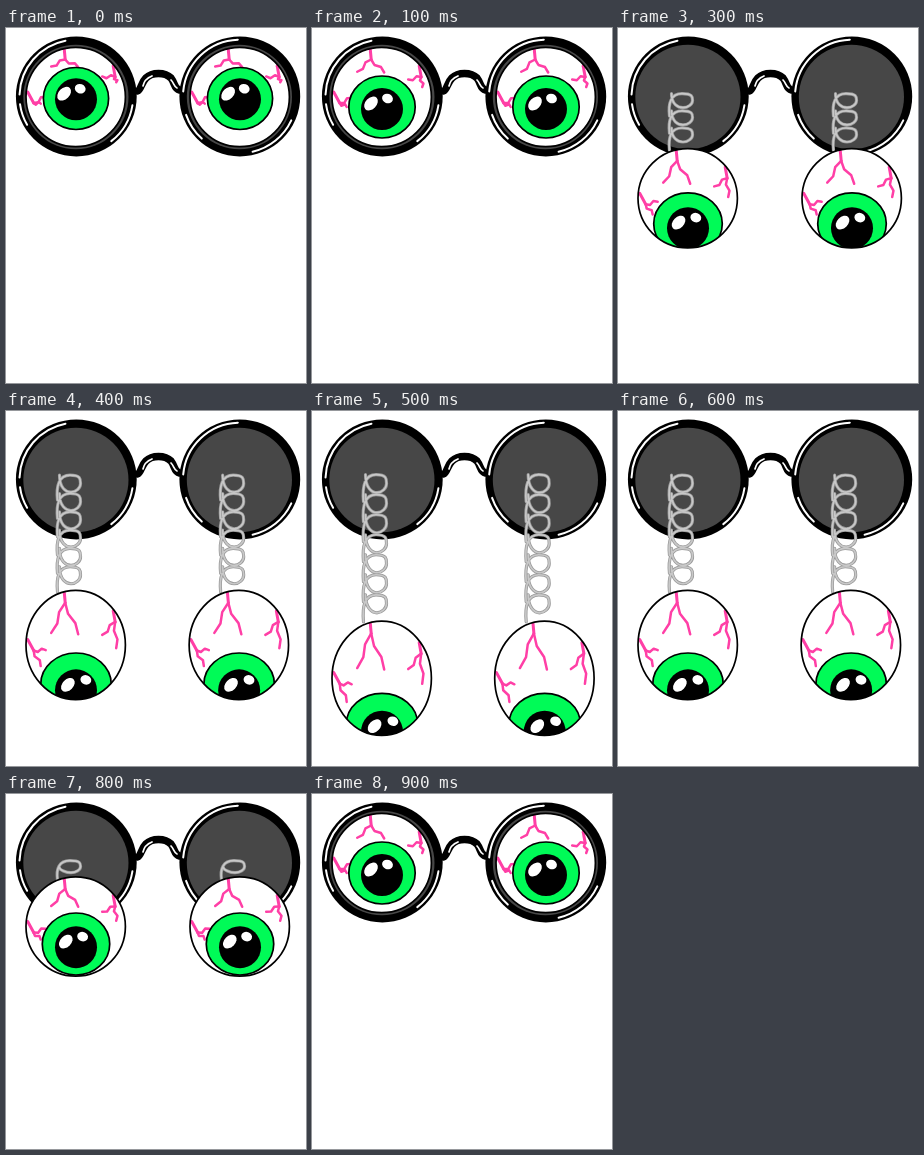
An HTML page for the animation above (1 s loop, 300 by 355 pixels).

```html
<!DOCTYPE html>
<html lang="en">
<head>
<meta charset="utf-8">
<title>Spring eyeball glasses</title>
<style>
html, body { margin: 0; width: 100%; height: 100%; overflow: hidden; background: #fff; }
svg { display: block; width: 300px; height: 355px; }
path { fill: none; stroke-linecap: round; stroke-linejoin: round; }
</style>
</head>
<body>
<svg id="stage" viewBox="0 0 300 355"></svg>
<script>
const NS = 'http://www.w3.org/2000/svg';
const stage = document.getElementById('stage');
const GREEN = '#00fb57', PINK = '#ff3fa6', LENS = '#474747';
const INK = { stroke: '#000', 'stroke-width': 1.7 };
const STEP = 100, EYE_X = 69.7, EYE_R = 49.7, LENS_Y = 68.4;

function add(parent, tag, attrs = {}) {
  const el = document.createElementNS(NS, tag);
  for (const key in attrs) el.setAttribute(key, attrs[key]);
  return parent.appendChild(el);
}

function oval(parent, cx, cy, rx, ry, attrs = {}, turn = 0) {
  return add(parent, 'ellipse', { cx, cy, rx, ry, transform: `rotate(${turn} ${cx} ${cy})`, ...attrs });
}

function line(parent, d, stroke, width) {
  add(parent, 'path', { d, stroke, 'stroke-width': width });
}

function shine(cx, from, to) {
  const r = 56.8;
  const at = deg => {
    const a = deg * Math.PI / 180;
    return `${cx + r * Math.cos(a)} ${LENS_Y + r * Math.sin(a)}`;
  };
  line(stage, `M${at(from)}A${r} ${r} 0 0 1 ${at(to)}`, '#fff', 2);
}

function drawGlasses() {
  line(stage, 'M131.5 63C135 62 135 55 140 50C146 44 159 44 165 50C169 55 168 61 173.5 62', '#000', 7.5);
  line(stage, 'M137 58C138 53 141 50 146 48', '#fff', 1.7);
  line(stage, 'M165 52C168 55 168 59 171 60', '#fff', 1.7);
  for (const cx of [70.3, 233.8]) {
    oval(stage, cx, LENS_Y, 60.4, 60);
    oval(stage, cx - 0.4, LENS_Y + 0.6, 52.6, 52.3, { fill: LENS });
  }
  [[182, 259], [150, 172], [9, 52]].forEach(a => shine(70.3, ...a));
  [[185, 268], [132, 161], [25, 77]].forEach(a => shine(233.8, ...a));
}

// The coil hangs from the lens centre and gains a loop for every 18.5px
function springPath(length) {
  const coils = Math.floor(length / 18.5);
  const pitch = length / (coils + 0.3);
  const r = 5.5 + coils / 2;
  let d = '';
  for (let i = 0; i < coils; i++) {
    const y = 72.7 + i * pitch;
    const end = coils > 1 ? y - r : y + 1;
    d += `M51.5 ${y + pitch * 0.9}C50 ${y + 2} 53 ${y - r} 64 ${y - r}` +
      `S74.5 ${y - r / 2} 74.5 ${y}S70 ${y + r} 65 ${y + r}S53.5 ${y + r / 2} 53.5 ${end}`;
  }
  return d;
}

// Root on the eyeball; fork and two tips measured from the root
const VEINS = [
  { root: [-11.5, -48.5], fork: [1, 11], tips: [[-13, 31], [14, 32]] },
  { root: [37.5, -31], fork: [2, 11], tips: [[-11, 18], [3, 28]] },
  { root: [-48, -5], fork: [6, 11], tips: [[18, 8], [13, 20]] }
];

// A branch with a slight S-shaped wobble
function branch([x, y], [u, v]) {
  const dx = (u - x) / 3, dy = (v - y) / 3;
  const len = Math.hypot(dx, dy) || 1;
  const nx = dy / len * 1.6, ny = -dx / len * 1.6;
  return `M${x} ${y}L${x + dx - nx} ${y + dy - ny} ${x + 2 * dx + nx} ${y + 2 * dy + ny} ${u} ${v}`;
}

function drawVeins(parent, cy, ry, grow) {
  for (const { root, fork, tips } of VEINS) {
    const x = EYE_X + root[0], y = cy + root[1] * ry / EYE_R;
    const mid = [x + fork[0], y + fork[1]];
    line(parent, `M${x} ${y}L${mid}`, PINK, 3);
    for (const [dx, dy] of tips) {
      line(parent, branch(mid, [x + dx, y + dy * grow]), PINK, 2.5);
    }
  }
}

// cy: height of the eyeball, look: how far the iris has turned down
function drawEye([cy, look], id) {
  const strain = Math.max(0, cy - 170.3) / 97;
  const ry = EYE_R + 7.5 * strain;
  const layer = add(stage, 'g');
  const eye = add(layer, 'g', { id: 'eye' + id });
  add(layer, 'use', { href: '#eye' + id, x: 164 - 1.3 * strain });

  const spring = springPath(cy - ry - 64);
  line(eye, spring, '#999', 3.2);
  line(eye, spring, '#c8c8c8', 1.7);

  oval(add(eye, 'clipPath', { id: 'clip' + id }), EYE_X, cy, EYE_R, ry);
  oval(eye, EYE_X, cy, EYE_R, ry, { fill: '#fff' });
  const g = add(eye, 'g', { 'clip-path': `url(#clip${id})` });
  drawVeins(g, cy, ry, 0.55 + look * 0.02);

  const iris = cy + look, pupil = iris + 0.5 + look * 0.15;
  oval(g, 70, iris, 32.5 + look * 0.07, 31, { fill: GREEN, ...INK });
  oval(g, 70, pupil, 21, 21);
  oval(g, 58 + look * 0.1, pupil - 5.5, 8, 5.5, { fill: '#fff' }, -45);
  oval(g, 74 + look * 0.15, pupil - 10.5, 5.5, 4.7, { fill: '#fff' }, 20);
  oval(eye, EYE_X, cy, EYE_R, ry, { fill: 'none', ...INK });
  return layer;
}

drawGlasses();

const poses = [[69, 1.5], [69, 10], [132.5, 17.5], [170.3, 25.5], [234, 39], [267.3, 46]];
const last = poses.length - 1, steps = last * 2;

// Down through the poses and back up again
poses.forEach((pose, id) => {
  const frames = [];
  for (let i = 0; i <= steps; i++) {
    const shown = last - Math.abs(last - i);
    frames.push({ opacity: shown === id ? 1 : 0, offset: i / steps, easing: 'steps(1, end)' });
  }
  drawEye(pose, id).animate(frames, { duration: steps * STEP, iterations: Infinity });
});
</script>
</body>
</html>
```
